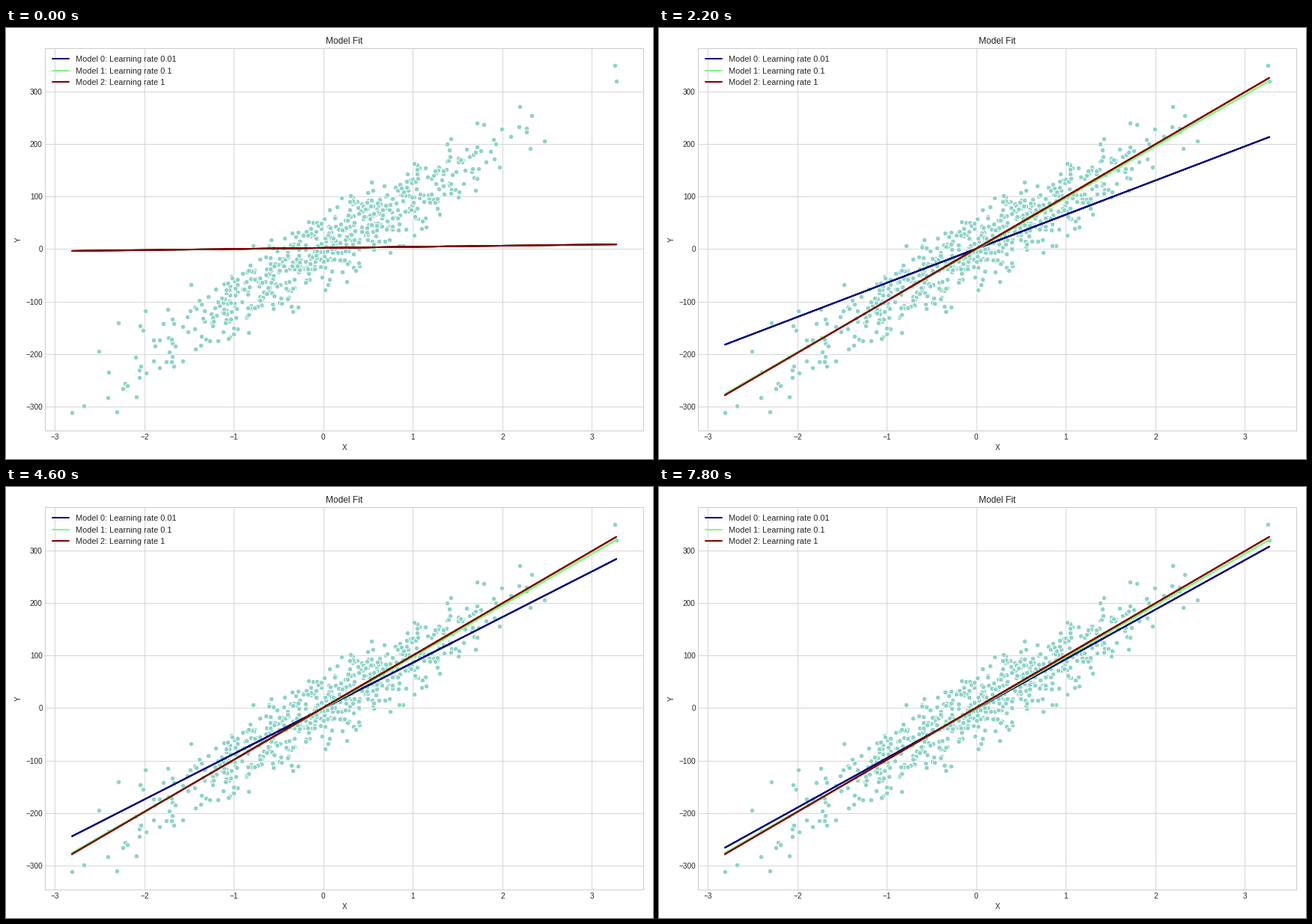
These frames come from a looping animation (864 by 576 pixels, 8000 ms). A matplotlib script:

```python
import numpy as np
import matplotlib.pyplot as plt
from matplotlib.animation import FuncAnimation

W, H, DPI = 864, 576, 72
FRAMES, STEP_MS = 40, 200
EPOCHS = 10                    # training epochs per frame
LEFT, RIGHT, TOP, BOTTOM = 52.3, 851.1, 27.2, 538.2
X0, X_UNIT = 423.8, 119.5      # stage position of the origin, pixels per unit
Y0, Y_UNIT = 295.35, 0.702

plt.rcParams.update({
    "font.family": "Liberation Sans", "font.size": 10,
    "text.color": "0.15", "axes.labelcolor": "0.15",
    "xtick.color": "0.15", "ytick.color": "0.15",
    "axes.edgecolor": "0.8", "axes.linewidth": 1,
    "grid.color": "0.8", "grid.linewidth": 0.8,
    "lines.solid_capstyle": "round",
})


def to_x(px):
    return (px - X0) / X_UNIT


def to_y(py):
    return (Y0 - py) / Y_UNIT


def make_data(count=660, slope=99, spread=38):
    """Normal x with a noisy linear y, plus the few outermost points."""
    rng = np.random.default_rng(21)
    x = rng.normal(0, 1, count)
    noise = rng.normal(0, spread, count)
    keep = (np.abs(x) < 2.45) & (np.abs(noise) < 2.4 * spread)
    ends = np.array([(-2.81, -312), (-2.68, -298), (-2.51, -195),
                     (-2.31, -310), (-2.29, -141), (2.47, 206),
                     (2.19, 271), (3.26, 350), (3.275, 320)])
    x_all = np.append(x[keep], ends[:, 0])
    y_all = np.append(slope * x[keep] + noise[keep], ends[:, 1])
    order = rng.permutation(len(x_all))
    return x_all[order], y_all[order]


# learning rate, final slope, final intercept
MODELS = [(0.01, 96.1, -1.7), (0.1, 98.0, -0.7), (1, 99.3, 0.8)]
START_SLOPE, START_BIAS = 2.07, 2.1


def approach(start, end, rate, steps):
    return end + (start - end) * (1 - rate) ** steps


xs, ys = make_data()

fig = plt.figure(figsize=(W / DPI, H / DPI), dpi=DPI, facecolor="white")
ax = fig.add_axes([LEFT / W, 1 - BOTTOM / H, (RIGHT - LEFT) / W, (BOTTOM - TOP) / H])
ax.set_axisbelow(True)
ax.grid(True)
ax.tick_params(length=0, pad=3.5)
ax.scatter(xs, ys, s=42, color="#8dd3c7", edgecolors="white", linewidths=0.9)

colors = plt.cm.jet(np.linspace(0, 1, len(MODELS)))
lines = [
    ax.plot(xs, START_SLOPE * xs + START_BIAS, color=c, lw=2,
            label=f"Model {i}: Learning rate {m[0]}")[0]
    for i, (m, c) in enumerate(zip(MODELS, colors))
]

ax.set_xlim(to_x(LEFT), to_x(RIGHT))
ax.set_ylim(to_y(BOTTOM), to_y(TOP))
ax.set_xticks(range(-3, 4))
ax.set_yticks(range(-300, 301, 100))
ax.set_title("Model Fit", fontsize=12)
ax.set_xlabel("X")
ax.set_ylabel("Y")
ax.legend(loc="upper left", fontsize=11, frameon=False)


def update(n):
    for line, (rate, slope, bias) in zip(lines, MODELS):
        k = approach(START_SLOPE, slope, rate, EPOCHS * n)
        b = approach(START_BIAS, bias, rate, EPOCHS * n / 2)  # settles slower
        line.set_ydata(k * xs + b)
    return lines


anim = FuncAnimation(fig, update, frames=FRAMES, interval=STEP_MS,
                     repeat=True, repeat_delay=0, blit=False)
plt.show()
```
